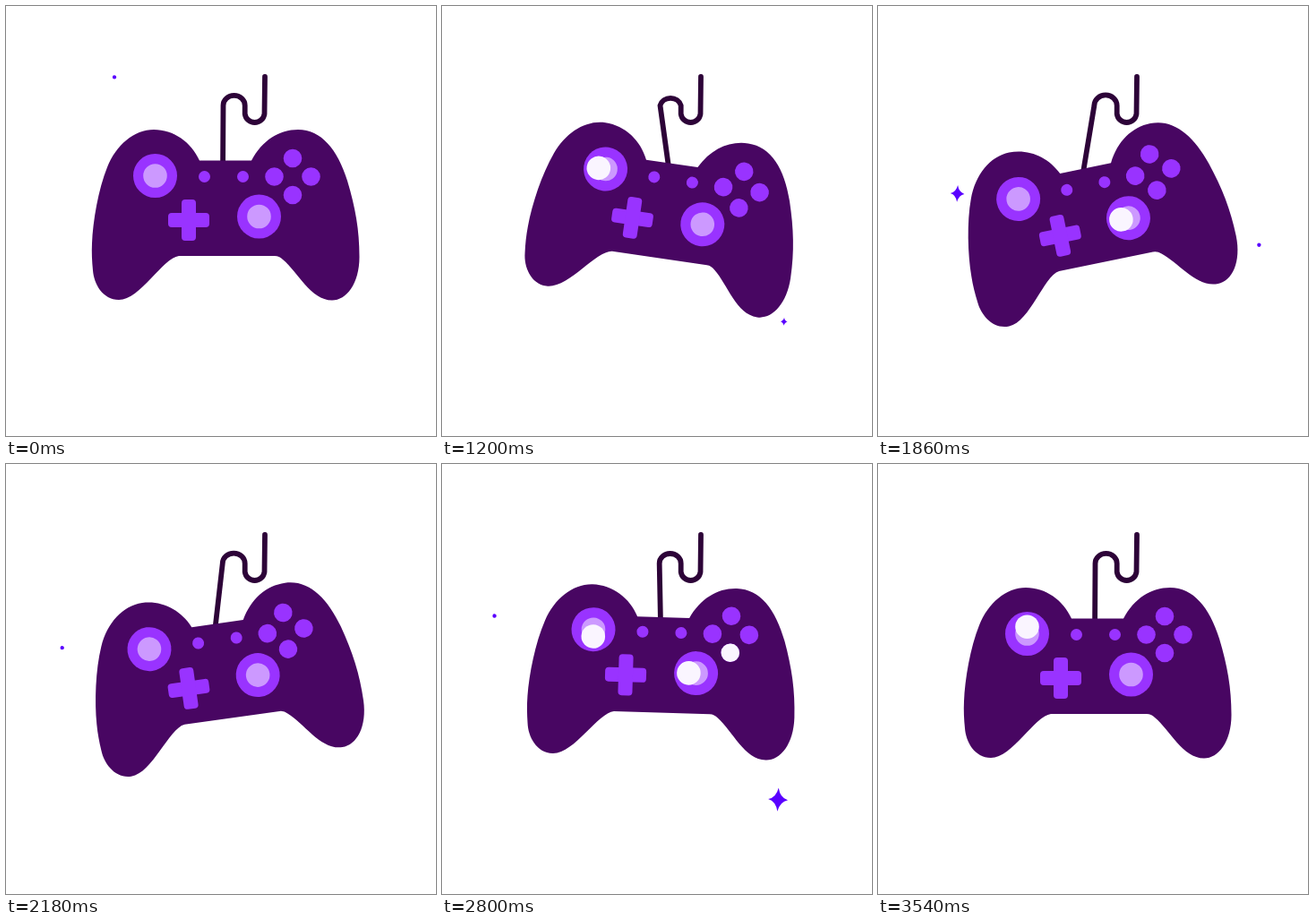
These frames come from a looping animation (480x480 px, 3.6 s). An HTML page:

```html
<!DOCTYPE html>
<html lang="en">
<head>
<meta charset="utf-8">
<title>Game controller</title>
<style>
  html, body { margin: 0; width: 100%; height: 100%; overflow: hidden; background: #fff; }
  svg { display: block; width: 100vw; height: 100vh; }
  .cable { fill: none; stroke: #2d0338; stroke-width: 5.8; stroke-linecap: round; stroke-linejoin: round; }
  .body { fill: #480662; }
  .key { fill: #9933ff; }
  .cap { fill: #cc99ff; }
  .lit { fill: #faf5ff; }
  .star { fill: #5a00ff; }
</style>
</head>
<body>
<svg viewBox="0 0 480 480">
  <g id="stars"></g>
  <path id="cable" class="cable"/>
  <g id="pad">
    <path class="body" d="M216 172.5H274C286 150 305 138 326 138C352 138 370 160 381 195C390 225 394.5 250 394.5 280C394.5 310 380 328.5 364 328.5C340 328.5 326 297 309 283Q305 279 300 279H193C175 281 150 328 126 328C108 328 98 310 97 295C96 285 95.5 275 96 265C97 240 103 205 113 180C123 155 143 138 165 138C187 138 207 152 216 172.5Z"/>
  </g>
  <g id="keys">
    <rect class="key" x="181" y="231" width="46" height="16" rx="4"/>
    <rect class="key" x="196" y="216" width="16" height="46" rx="4"/>
  </g>
</svg>
<script>
const LOOP = 3600, HOLD = 360, LIFE = 440;
const PIVOT = { x: 224.5, y: 212 };
const $ = id => document.getElementById(id);
const mix = (a, b, u) => a + (b - a) * u;
const ease = u => (1 - Math.cos(Math.PI * u)) / 2;

function add(parent, tag, attrs) {
  const el = document.createElementNS('http://www.w3.org/2000/svg', tag);
  for (const k in attrs) el.setAttribute(k, attrs[k]);
  return parent.appendChild(el);
}
const disc = (cls, cx, cy, r) => add($('keys'), 'circle', { class: cls, cx, cy, r });

// Controls: "reach" is how far a press lies from the centre
const controls = {
  left: { x: 166.5, y: 189.5, reach: 7.8, r: 13.3 },
  right: { x: 282.5, y: 235, reach: 8.2, r: 13.3 },
  face: { x: 320, y: 190.5, reach: 20.5, r: 10.3 }
};
const DIRS = ['right', 'down', 'left', 'up'];
const spot = (c, dir) => {
  const a = DIRS.indexOf(dir) * Math.PI / 2;
  return [c.x + c.reach * Math.cos(a), c.y + c.reach * Math.sin(a), c.r];
};

for (const { x, y, r } of [controls.left, controls.right]) {
  disc('key', x, y, 24.5);
  disc('cap', x, y, r);
}
for (const dir of DIRS) disc('key', ...spot(controls.face, dir));
for (const x of [221.5, 264.5]) disc('key', x, 190.5, 6.5);

const beats = [
  { at: 440, left: 'up', right: 'right', face: 'left' },
  { at: 1000, left: 'left' },
  { at: 1700, right: 'left' },
  { at: 2280, right: 'left', face: 'up' },
  { at: 2640, left: 'down', right: 'left', face: 'down' },
  { at: 3400, left: 'up' }
];
const presses = beats.flatMap(({ at, ...moves }) =>
  Object.entries(moves).map(([name, dir]) =>
    ({ at, el: disc('lit', ...spot(controls[name], dir)) })));

// The keys slide a little further (sx, sy) than the body
const rest = { x: 0, y: 0, angle: 0, sx: 0, sy: 0 };
const dip = { x: 6.2, y: 0, angle: 8.3, sx: 6, sy: 0.6 };
const tilt = { x: -5, y: 12, angle: -11.6, sx: -1.5, sy: 1.8 };
const lift = { x: 2.5, y: -5.3, angle: 4.4, sx: 2.2, sy: -2.7 };
const track = [
  [0, rest], [620, dip], [1200, dip], [1680, tilt],
  [2080, tilt], [2400, lift], [3100, rest], [LOOP, rest]
];

function poseAt(t) {
  const i = track.findIndex(([time]) => time > t);
  const [t0, a] = track[i - 1], [t1, b] = track[i];
  const u = ease((t - t0) / (t1 - t0)), pose = {};
  for (const k in a) pose[k] = mix(a[k], b[k], u);
  return pose;
}

// Stars fly outwards from behind the pad: end time and end point
const stars = [
  [20, 120, 78], [580, 470, 302], [1120, 77, 85],
  [1250, 385, 355], [1880, 427, 267], [2190, 62, 205],
  [2820, 57, 169], [3020, 390, 390], [3520, 363, 357]
].map(([end, x, y]) => ({ end, x, y, el: add($('stars'), 'path', { class: 'star' }) }));

function starPath(w) {
  const h = w * 1.2, q = w * 0.2, r = 2.2;
  return `M0 ${-h}Q${q} ${-q} ${w} 0Q${q} ${q} 0 ${h}Q${-q} ${q} ${-w} 0Q${-q} ${-q} 0 ${-h}Z` +
    `M${-r} 0A${r} ${r} 0 0 1 ${r} 0A${r} ${r} 0 0 1 ${-r} 0Z`;
}

function drawStar({ end, x, y, el }, t) {
  const u = 1 - (end - t) / LIFE, live = u >= 0 && u < 1;
  el.style.display = live ? '' : 'none';
  if (!live) return;
  const far = mix(0.8, 1, u);
  el.setAttribute('d', starPath(11 * Math.sin(Math.PI * u)));
  el.setAttribute('transform', `translate(${mix(240, x, far)} ${mix(235, y, far)}) rotate(3)`);
}

function draw(t) {
  const { x, y, angle, sx, sy } = poseAt(t);
  const turn = `rotate(${angle} ${PIVOT.x} ${PIVOT.y})`;
  $('pad').setAttribute('transform', `translate(${x} ${y}) ${turn}`);
  $('keys').setAttribute('transform', `translate(${x + sx} ${y + sy}) ${turn}`);

  const sway = x + angle * 0.75;
  $('cable').setAttribute('d',
    `M289 79L288.5 120.5A11 11 0 0 1 266.7 120.5V111A12 11 0 0 0 ${242.5 + sway * 0.08} 111L${242 + sway} 190`);

  for (const { at, el } of presses)
    el.style.display = t >= at && t < at + HOLD ? '' : 'none';
  for (const star of stars) drawStar(star, t);
}

const start = performance.now();
function tick() {
  draw((performance.now() - start) % LOOP);
  requestAnimationFrame(tick);
}
tick();
</script>
</body>
</html>
```
